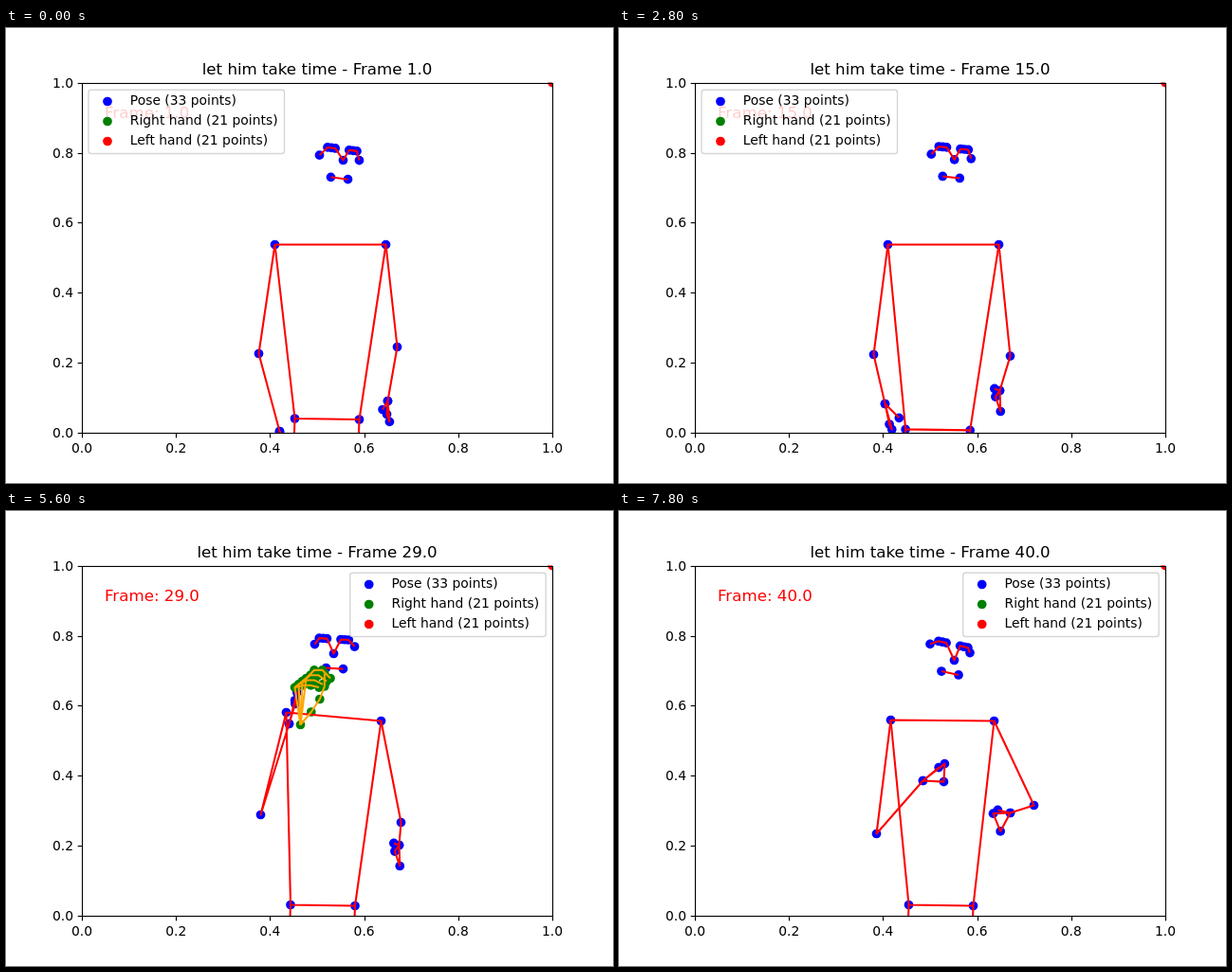
An HTML page with a canvas for the animation above (8000 ms loop, 640 by 480 pixels).

```html
<!DOCTYPE html>
<html lang="en">
<head>
<meta charset="utf-8">
<title>Pose plot</title>
<style>
  html, body { margin: 0; width: 100%; height: 100%; overflow: hidden; background: #fff; }
  canvas { display: block; }
</style>
</head>
<body>
<canvas id="plot" width="640" height="480"></canvas>
<script>
const ctx = document.getElementById('plot').getContext('2d');
const LOOP = 8000, STEP = 200;
const BOX = { x: 80, y: 57.6, w: 496, h: 369.6 };
const SMALL = 13.89, LARGE = 16.67;

// Key moments of the gesture
const SETTLE = 1200, LIFT = 2800, RISE = 3800, TOP = 4600, FALL = 5600, LOW = 6800, END = 7800;

// Linear motion through [time, ...values] keys, held before the first and after the last
function follow(time, ...keys) {
  const next = keys.findIndex(key => key[0] > time);
  if (next === 0) return keys[0].slice(1);
  if (next < 0) return keys.at(-1).slice(1);
  const a = keys[next - 1], b = keys[next];
  const k = (time - a[0]) / (b[0] - a[0]);
  return a.slice(1).map((v, i) => v + (b[i + 1] - v) * k);
}

const add = ([x, y], dx, dy) => [x + dx, y + dy];
function polar(p, degrees, length) {
  const a = degrees * Math.PI / 180;
  return add(p, length * Math.cos(a), length * Math.sin(a));
}

// Ears and mouth sit on the head; eyes and nose slide with its turn and drop
function faceAt(time) {
  const [x, y, turn, drop, tilt] = follow(time,
    [SETTLE, 351, 127, 4, 12, 0.13], [RISE, 349, 125.3, 3, 12.7, 0.1],
    [TOP, 346, 134.6, -1, 15.4, 0.06], [FALL, 346, 134.6, -1, 15.4, 0.06],
    [LOW, 346.5, 135.3, 1, 15.7, 0.07], [END, 348.5, 139.5, 4.5, 17.5, 0.22]);
  const at = (u, v) => [x + u, y + v + u * tilt];
  const eyes = side => [0, 1, 2].map(i => at(0.75 * turn + side * (7.3 + 4.1 * i), 0));
  const ear = side => at(21 * side, 19 - 0.8 * drop);
  return {
    brow: [ear(-1), ...eyes(-1).reverse(), [x + turn, y + drop], ...eyes(1), ear(1)],
    mouth: [at(-9, 31), at(9, 31)]
  };
}

function torsoAt(time) {
  const hips = follow(time, [0, 338, 412], [SETTLE, 337.5, 424], [RISE, 334.5, 423],
    [TOP, 333.5, 415.5], [FALL, 333.5, 415.5], [END, 339, 415.5]);
  return {
    right: follow(time, [RISE, 283, 228], [TOP, 295, 212], [FALL, 295, 212], [END, 286, 220]),
    left: follow(time, [LIFT, 400, 228], [TOP, 395, 221]),
    hipR: add(hips, -34, -0.5), hipL: add(hips, 34, 0.5)
  };
}

function arm(shoulder, elbow, wrist, [angle, spread, thumb, length]) {
  const pinky = polar(wrist, angle + spread, 22);
  const index = polar(wrist, angle, length);
  return [shoulder, elbow, wrist, pinky, index, wrist, polar(wrist, angle + thumb, 0.75 * length)];
}

const rightArm = (time, shoulder) => arm(shoulder,
  follow(time, [0, 266, 343], [LIFT, 268, 344], [RISE, 264, 354], [TOP, 268, 320],
    [FALL, 268, 320], [END, 271, 340]),
  follow(time, [0, 288, 425], [SETTLE, 281, 418], [LIFT, 280, 396], [RISE, 277, 305],
    [TOP, 298, 224], [FALL, 298, 224], [LOW, 305, 265], [END, 320, 284]),
  follow(time, [LIFT, 75, 3, -30, 28], [RISE, -88, -6, 0, 28], [TOP, -76, 3, 0, 34],
    [FALL, -76, 3, 0, 34], [LOW, -84, 26, 5, 27], [END, -38, 41, -2, 29]));

const leftArm = (time, shoulder) => arm(shoulder,
  follow(time, [0, 412, 336], [RISE, 412, 349], [TOP, 416, 328], [FALL, 416, 328],
    [LOW, 438, 317], [END, 437, 310]),
  follow(time, [0, 402, 393], [LIFT, 401, 382], [RISE, 408, 352], [TOP, 414, 352],
    [FALL, 414, 352], [LOW, 419, 326], [END, 412, 318]),
  follow(time, [0, 94, -9, 27, 14], [SETTLE, 125, -37, 75, 8], [FALL, 125, -37, 75, 8],
    [LOW, 165, -49, 15, 22], [END, 178, -60, 15, 18]));

// A curved thumb and four arched fingers
function handFrom(wrist) {
  const palm = add(wrist, 12, 1);
  const joints = [0, 1, 2, 3];
  const thumb = joints.map(j =>
    add(palm, 26 * Math.sin((j + 1) * Math.PI / 7), -13.5 * (j + 1)));
  const fingers = joints.map(f => joints.map(j =>
    add(palm, 6 - 4 * f + 8.5 * j, 3.2 * f - 49 - (10 - 2.5 * f) * Math.sin(j * Math.PI / 3))));
  return { palm, thumb, fingers };
}

function dots(points, color) {
  ctx.fillStyle = color;
  for (const [x, y] of points) {
    ctx.beginPath();
    ctx.arc(x, y, 4.86, 0, 2 * Math.PI);
    ctx.fill();
  }
}

function line(points, color = 'red', width = 2.08) {
  ctx.strokeStyle = color;
  ctx.lineWidth = width;
  ctx.beginPath();
  points.forEach(([x, y]) => ctx.lineTo(x, y));
  ctx.stroke();
}

function text(str, x, y, size = SMALL, align = 'left', color = '#000') {
  ctx.font = `${size}px "DejaVu Sans", sans-serif`;
  ctx.textAlign = align;
  ctx.fillStyle = color;
  ctx.fillText(str, x, y);
}

function drawFigure(time) {
  const { brow, mouth } = faceAt(time);
  const { right, left, hipR, hipL } = torsoAt(time);
  const armR = rightArm(time, right), armL = leftArm(time, left);
  const { palm, thumb, fingers } = handFrom(armR[2]);
  const handSeen = time >= 4400 && time < 6000;

  dots([...brow, ...mouth, hipR, hipL, ...armR, ...armL], 'blue');
  if (handSeen) dots([palm, ...thumb, ...fingers.flat()], 'green');

  [brow, mouth, [right, left, hipL, hipR, right], armR, armL].forEach(path => line(path));
  for (const hip of [hipR, hipL]) line([hip, add(hip, -4, 110)]);
  if (handSeen) {
    [thumb, ...fingers].forEach(f => line([palm, ...f], 'orange'));
    line(fingers.map(f => f[0]), 'orange');
  }
}

function drawAxes() {
  const snap = v => Math.round(v) + 0.5;
  const left = snap(BOX.x), bottom = snap(BOX.y + BOX.h);
  ctx.strokeStyle = '#000';
  ctx.lineWidth = 1.11;
  ctx.strokeRect(left, snap(BOX.y), BOX.w, bottom - snap(BOX.y));
  for (let i = 0; i <= 5; i++) {
    const x = BOX.x + BOX.w * i / 5, y = BOX.y + BOX.h * (1 - i / 5);
    const label = (i / 5).toFixed(1);
    line([[snap(x), bottom], [snap(x), bottom + 4.86]], '#000', 1.11);
    line([[left, snap(y)], [left - 4.86, snap(y)]], '#000', 1.11);
    text(label, x, 448, SMALL, 'center');
    text(label, 71, Math.round(y + 5), SMALL, 'right');
  }
}

function drawLegend(x) {
  ctx.globalAlpha = 0.8;
  ctx.beginPath();
  ctx.roundRect(x, 65.2, 206.5, 67.3, 2.78);
  ctx.fillStyle = '#fff';
  ctx.fill();
  ctx.strokeStyle = '#ccc';
  ctx.lineWidth = 1.39;
  ctx.stroke();
  ctx.globalAlpha = 1;
  [['Pose (33 points)', 'blue'], ['Right hand (21 points)', 'green'], ['Left hand (21 points)', 'red']]
    .forEach(([label, color], i) => {
      dots([[x + 20, 77.5 + 21 * i]], color);
      text(label, x + 43.8, 81 + 21 * i);
    });
}

function draw(time) {
  const count = (time / STEP + 1).toFixed(1);
  ctx.fillStyle = '#fff';
  ctx.fillRect(0, 0, 640, 480);

  ctx.save();
  ctx.beginPath();
  ctx.rect(BOX.x, BOX.y, BOX.w, BOX.h);
  ctx.clip();
  dots([[BOX.x + BOX.w, BOX.y]], 'red');
  ctx.translate(0.5, 0.5);
  ctx.lineJoin = 'round';
  drawFigure(time);
  ctx.restore();

  drawAxes();
  text(`let him take time - Frame ${count}`, 328, 49, LARGE, 'center');
  text(`Frame: ${count}`, 104, 95, LARGE, 'left', 'red');
  drawLegend(time < TOP ? 87 : 362.7);
}

const start = performance.now();
function tick() {
  const elapsed = (performance.now() - start) % LOOP;
  draw(Math.floor(elapsed / STEP) * STEP);
  requestAnimationFrame(tick);
}
tick();
</script>
</body>
</html>
```
